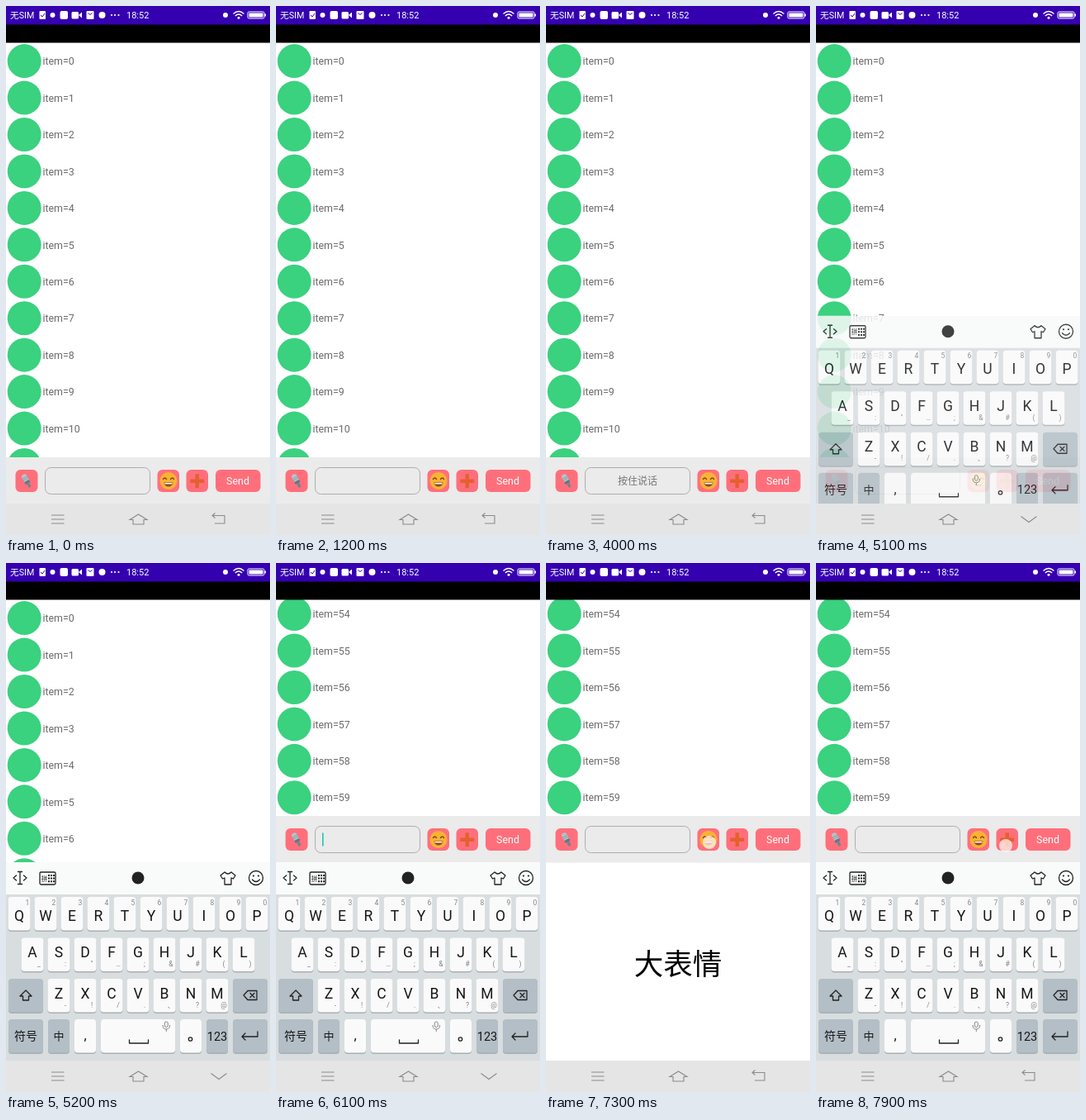
These frames come from a looping animation (320x640 px, 8 s). An HTML page:

```html
<!DOCTYPE html>
<html lang="zh-CN">
<head>
<meta charset="utf-8">
<style>
html, body { margin: 0; width: 100%; height: 100%; overflow: hidden; background: #fff; }
svg { display: block; width: 320px; height: 640px; font-family: Roboto, "Noto Sans CJK SC", "Noto Sans CJK", sans-serif; }
.line { fill: none; stroke: #222; stroke-width: 1.3; stroke-linejoin: round; stroke-linecap: round; }
.nav { fill: none; stroke: #8b8b8b; stroke-width: 1.1; }
.mid { text-anchor: middle; }
</style>
</head>
<body>
<svg id="stage" viewBox="0 0 320 640"></svg>
<script>
const ROW = 400 / 9, LOOP = 8000;
const rect = (x, y, w, h, fill, r = 0, more = '') =>
  `<rect x="${x}" y="${y}" width="${w}" height="${h}" rx="${r}" fill="${fill}" ${more}/>`;
const circle = (x, y, r, fill, more = '') => `<circle cx="${x}" cy="${y}" r="${r}" fill="${fill}" ${more}/>`;
const path = (d, more = 'class="line"') => `<path d="${d}" ${more}/>`;
const text = (x, y, size, fill, s, more = 'class="mid"') =>
  `<text x="${x}" y="${y}" font-size="${size}" fill="${fill}" ${more}>${s}</text>`;
const group = (id, body, more = '') => `<g id="${id}" ${more}>${body}</g>`;

function list(from, count, top) {
  let s = '';
  for (let i = 0; i < count; i++) {
    const y = top + (i + .5) * ROW;
    s += circle(22.2, y, 20.5, '#3ad17f') + text(44.4, y + 4.7, 12.44, '#6b6b6b', 'item=' + (from + i), '');
  }
  return s;
}

function statusBar() {
  const white = 'fill="none" stroke="#fff" stroke-width="1.3"';
  return rect(0, 0, 320, 44.5, '#000') + rect(0, 0, 320, 22.5, '#3500b0') +
    text(5, 15, 10.7, '#fff', '无SIM', '') +
    rect(40.5, 6, 7.5, 10, '#fff', 1) + path('M42 11l2 2 3-4', 'fill="none" stroke="#3500b0"') +
    circle(56.5, 11, 3, '#fff') + rect(65.5, 6, 9.5, 10, '#fff', 2) +
    rect(79.5, 7, 8.5, 8.5, '#fff', 1.5) + path('M88 11l4-3.5v7z', 'fill="#fff"') +
    rect(97.5, 6, 9, 10, '#fff', 1) + path('M99.5 8.5l2.5 2 2.5-2', 'fill="none" stroke="#3500b0"') +
    circle(116.5, 11, 4, '#fff') +
    [128, 132, 136.5].map(x => circle(x, 11, 1.1, '#fff')).join('') +
    text(146, 15, 11, '#fff', '18:52', '') + circle(266, 11, 3, '#fff') +
    path('M275.5 9.5q6.5-6 13 0M277.8 12q4.2-4 8.4 0', white) + circle(282, 14.3, 1.5, '#fff') +
    rect(293, 7, 20, 8, 'none', 1.5, 'stroke="#fff"') + rect(294.5, 8.5, 17, 5, '#fff') + rect(313.5, 9.5, 1.5, 3, '#fff');
}

// Message bar, drawn from its own top edge
function inputBar() {
  const button = (x, w) => rect(x, 15, w, 27, '#ff6f7b', 6);
  const mic = `<g transform="translate(25 28.5) rotate(-28) scale(1.1)">` +
    rect(-3, -8, 6, 9.5, '#b4c3c9', 3) + path('M-3-4h6M-3-2h6', 'stroke="#82949c" stroke-width=".7"') +
    rect(-3, 0, 6, 3, '#607983', 1) + rect(-1.5, 3, 3, 5, '#6d8791', 1) + '</g>';
  const brown = 'fill="none" stroke="#7b4526" stroke-width="1.4" stroke-linecap="round"';
  const smile = circle(197, 28.5, 10.5, '#f9b233') +
    path('M190.5 26.5q2-3 4 0M199.5 26.5q2-3 4 0', brown) +
    path('M191.5 30.5h11q-1 5-5.5 5t-5.5-5z', 'fill="#8f4a2c"') +
    path('M192.5 31h9v1.4h-9z', 'fill="#fff"');
  return rect(0, 0, 320, 56.5, '#ebebeb') + button(11.5, 27) +
    rect(47.5, 12.5, 127, 32, '#ebebeb', 7, 'stroke="#adadad"') +
    button(183.5, 26.5) + button(218.5, 26.5) + button(254, 54.5) + mic + smile +
    path('M231.7 20.3v17M223.2 28.8h17', 'stroke="#e4602f" stroke-width="4.4"') +
    text(281, 33, 12.4, '#fff', 'Send') +
    group('hint', text(111, 33, 12, '#777', '按住说话')) +
    group('caret', rect(56, 20.5, 1.6, 16, '#20c5b5'));
}

function keyboard() {
  const key = (x, y, w, special) =>
    rect(x, y + 1, w, 41, '#a9afb3', 4) + rect(x, y, w, 40.5, special ? '#b3bec6' : '#fafafb', 4);
  const letters = (chars, subs, x, y, base, subX, subY) => [...chars].map((c, i) => {
    const cx = x + 32 * i;
    return key(cx - 13.5, y, 27) + text(cx, y + base, 17.5, '#161616', c) +
      text(cx + subX, y + subY, 8.5, '#858585', subs[i].replace('&', '&amp;'));
  }).join('');
  const dots = [0, 1, 2].map(i => `M51 ${378 + 3.6 * i}h8`).join('');
  const toolbar = rect(0, 362, 320, 39, '#f9fafa') +
    path('M17 374v14M14.5 373.5h5M14.5 388.5h5M12.5 378l-3.5 3 3.5 3M21.5 378l3.5 3-3.5 3') +
    rect(41, 374, 19, 15, 'none', 1.5, 'class="line"') + text(46.5, 384.5, 7.5, '#222', '拼') +
    path(dots, 'stroke="#222" stroke-width="2" stroke-dasharray="2 1"') +
    circle(160, 381, 7.5, '#222') +
    path('M265 374q4 4 8 0l5 4-2.5 4-2.5-1v8h-8v-8l-2.5 1-2.5-4z') +
    circle(303, 381, 8.5, 'none', 'class="line"') + path('M298.5 383q4.5 5 9 0') +
    circle(300, 378.5, 1.1, '#222') + circle(306, 378.5, 1.1, '#222');
  const bottom = key(3, 552, 42, 1) + text(24, 577, 14, '#161616', '符号') +
    key(51, 552, 26, 1) + text(64, 577, 13, '#161616', '中') +
    key(83, 552, 26) + text(96, 577, 16, '#161616', ',') +
    key(115, 552, 90) + path('M149.5 577v4h23v-4') +
    rect(192.3, 555, 4, 6.5, 'none', 2, 'stroke="#888"') +
    path('M190 559q0 5 4.3 5t4.3-5M194.3 564v3', 'fill="none" stroke="#888"') +
    key(211, 552, 26) + circle(223.5, 576, 2.2, 'none', 'class="line"') +
    key(243, 552, 26, 1) + text(256, 577.5, 14.5, '#161616', '123') +
    key(275, 552, 42, 1) + path('M305 567v6h-19M290 569l-4 4 4 4');
  return rect(0, 400, 320, 203, '#d8dddf') + toolbar +
    letters('QWERTYUIOP', '1234567890', 16, 404, 28.5, 10, 9.5) +
    letters('ASDFGHJKL', '_:"…;&#()', 32, 453.5, 23.5, 8, 34.5) +
    letters('ZXCVBNM', '-!/.、?@', 64, 503, 23.5, 8, 34.5) +
    key(3, 503, 42, 1) + path('M24 517l-7 7h3.5v5h7v-5h3.5z') +
    key(275, 503, 42, 1) + path('M288 523l5-5.5h11v11h-11zM296 520.5l5 5M301 520.5l-5 5') + bottom;
}

const nav = rect(0, 602, 320, 38, '#e5e5e5') +
  path('M55 616h15.5M55 621h15.5M55 626h15.5', 'class="nav"') +
  path('M150 621.5l10.5-6.5 10.5 6.5h-4v5.5h-13v-5.5z', 'class="nav"') +
  group('back', path('M250 616.5h15v9.5h-12M253.5 613.5l-3.5 3 3.5 3', 'class="nav"')) +
  group('down', path('M248.5 617.5l9.5 7 9.5-7', 'class="nav"'));

document.getElementById('stage').innerHTML =
  rect(0, 0, 320, 640, '#fff') +
  group('top', list(0, 12, 44.4)) + group('end', list(54, 6, 306 - 6 * ROW)) +
  statusBar() +
  group('bar', inputBar()) +
  group('panel', text(160, 498, 35.5, '#000', '大表情')) +
  group('keys', keyboard()) + nav +
  group('touch', circle(0, 0, 8, '#fff3ec', 'opacity=".75"'));

const el = id => document.getElementById(id);
const show = (id, on) => el(id).setAttribute('display', on ? 'inline' : 'none');
const move = (id, x, y) => el(id).setAttribute('transform', `translate(${x} ${y})`);
const within = (t, a, b) => t >= a && t < b;
const ramp = (t, start, ms) => Math.max(0, Math.min(1, (t - start) / ms));

// start, end, x, y of each tap
const taps = [[3500, 3750, 26, 577], [4800, 4980, 26, 577], [5900, 6050, 198, 338],
  [7200, 7390, 198, 338], [7800, 8000, 230, 342]];

function draw(t) {
  const raised = t >= 5300;
  show('top', !raised);
  show('end', raised);
  move('bar', 0, raised ? 306 : 546);
  show('hint', within(t, 3800, 4950));
  show('caret', within(t, 5400, 6390));
  show('panel', t >= 6390);

  const rise = t < 7000 ? ramp(t, 5000, 200) : ramp(t, 7400, 200);
  const fall = t < 7000 ? ramp(t, 6390, 90) : 0;
  const alpha = Math.min(1, rise * 1.7) * (1 - fall);
  show('keys', alpha > 0);
  el('keys').setAttribute('opacity', alpha);
  move('keys', 0, 52 * (1 - rise) ** 2 + 26 * fall);

  const closable = within(t, 5000, 6480);
  show('down', closable);
  show('back', !closable);

  const tap = taps.find(([a, b]) => within(t, a, b));
  show('touch', tap);
  if (tap) move('touch', tap[2], tap[3]);
}

const start = performance.now();
function tick() {
  draw((performance.now() - start) % LOOP);
  requestAnimationFrame(tick);
}
tick();
</script>
</body>
</html>
```
